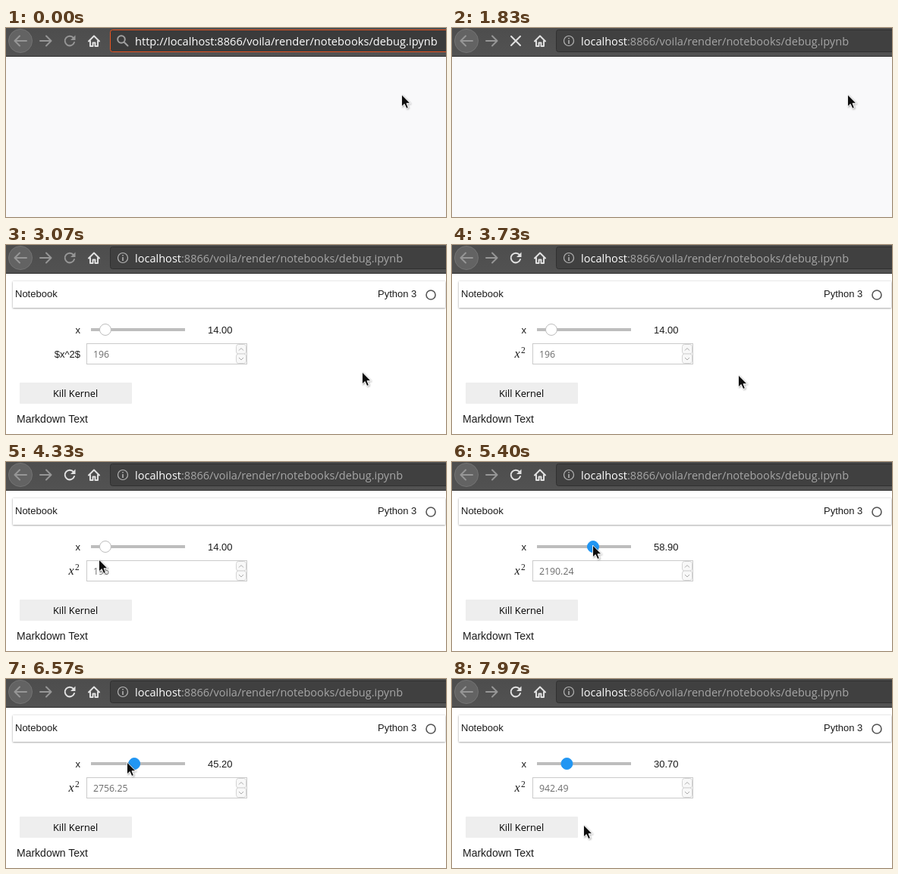
These frames come from a looping animation (580x250 px, 8 s). An HTML page:

```html
<!DOCTYPE html>
<html>
<head>
<meta charset="utf-8">
<style>
html, body { margin: 0; width: 100%; height: 100%; overflow: hidden; background: #fff; }
svg { display: block; }
text { font: 13px "Liberation Sans", Arial, sans-serif; fill: #1c1c1c; white-space: pre; }
.ui { font-family: "Open Sans", "Noto Sans", sans-serif; }
.url { font-size: 14.56px; fill: #a6a6a6; }
.lit { fill: #fff; }
.math { font-family: "Liberation Serif", Times, serif; }
.line { fill: none; stroke-width: 2; stroke-linecap: round; stroke-linejoin: round; }
</style>
</head>
<body>
<svg width="580" height="250" viewBox="0 0 580 250">
  <defs>
    <linearGradient id="chrome" x2="0" y2="1">
      <stop stop-color="#4d4d4d"/><stop offset="1" stop-color="#525252"/>
    </linearGradient>
    <filter id="shade" x="-5%" y="-20%" width="110%" height="150%">
      <feDropShadow dx="0" dy=".6" stdDeviation=".9" flood-opacity=".45"/>
    </filter>
    <filter id="soft" x="-40%" y="-40%" width="200%" height="200%">
      <feDropShadow dx="1" dy="1" stdDeviation="1" flood-opacity=".35"/>
    </filter>
  </defs>

  <rect id="page" y="38" width="580" height="212"/>

  <g id="header">
    <rect x="9" y="48" width="570" height="35" fill="#fff" filter="url(#shade)"/>
    <text x="12" y="69">Notebook</text>
    <text x="490" y="69">Python 3</text>
    <circle id="kernel" cx="560" cy="66" r="6" stroke="#555" stroke-width="1.6"/>
  </g>

  <g id="widgets">
    <text x="98" y="117" text-anchor="end">x</text>
    <rect x="112" y="110" width="124" height="4" fill="#bdbdbd"/>
    <circle id="knob" cy="112" r="7.5"/>
    <text id="value" x="266" y="117"></text>
    <text id="raw" x="98" y="149" text-anchor="end">$x^2$</text>
    <g id="typeset">
      <text class="math" x="82.5" y="149" style="font-size:16px;font-style:italic">x</text>
      <text class="math" x="91" y="143" style="font-size:11.5px">2</text>
    </g>
    <rect x="106.5" y="130.5" width="211" height="27" fill="#fff" stroke="#cacaca"/>
    <text id="square" class="ui" x="115" y="149" style="font-size:12.3px;fill:#6c6c6c"></text>
    <g fill="#f8f8f8" stroke="#d4d4d4">
      <rect x="303.5" y="131.5" width="13" height="12.5" rx="3"/>
      <rect x="303.5" y="144" width="13" height="12.5" rx="3"/>
      <path d="M307 139.5l3-3 3 3M307 149l3 3 3-3" fill="none" stroke="#aaa"/>
    </g>
    <rect x="18" y="182" width="148" height="28" rx="1" fill="#eee"/>
    <text class="ui" x="62" y="201" style="font-size:12.75px;fill:#000">Kill Kernel</text>
    <text x="14" y="235" style="font-size:14px">Markdown Text</text>
  </g>

  <rect width="580" height="38" fill="url(#chrome)"/>
  <rect y="37" width="580" height="1" fill="#2c2c2c"/>
  <circle cx="19" cy="17" r="15.5" fill="#636363" stroke="#737373"/>
  <path class="line" stroke="#969696" d="M27 17H12M18 10.5L11.5 17l6.5 6.5M45 17h14M53 10.5l6.5 6.5-6.5 6.5"/>
  <g id="reload">
    <path class="line" d="M89 13.2A6.3 6.3 0 1 0 90 19"/>
    <path d="M91.5 9.5v6.5h-6.5z" stroke="none"/>
  </g>
  <path id="stop" class="line" stroke="#e2e2e2" d="M78 11l12 12M90 11L78 23"/>
  <path class="line" stroke="#e2e2e2" d="M109 17.5l7-7 7 7M111 17v7h3.5v-4.5h3V24h3.5v-7"/>
  <rect id="field" x="137.5" y="2.5" width="460" height="29" rx="3"/>
  <path id="search" class="line" stroke="#a0a0a0" d="M155.5 18.5l5 5M156.8 15a4.8 4.8 0 1 1-9.6 0a4.8 4.8 0 1 1 9.6 0"/>
  <g id="info" stroke="#b5b5b5">
    <circle cx="154" cy="17" r="6.5" fill="none" stroke-width="1.2"/>
    <path d="M154 16v5M154 13v1.6" stroke-width="1.5"/>
  </g>
  <text id="typed" class="ui url lit" x="170" y="23" style="font-size:14.66px">http://localhost:8866/voila/render/notebooks/debug.ipynb</text>
  <text id="visited" class="ui url" x="170" y="23"><tspan class="lit">localhost</tspan>:8866/voila/render/notebooks/debug.ipynb</text>
  <rect id="caret" x="569" y="9" width="1" height="17" fill="#f4f4f4"/>

  <path id="mouse" d="M-.5 0V16l3.7-3.4L5.8 18.5l2.6-1.1L6 11.7H11z" fill="#111" stroke="#fff" stroke-width=".9" filter="url(#soft)"/>
</svg>
<script>
const LOOP = 8000, STEP = 30;
const el = id => document.getElementById(id);
const set = (id, attrs) => { for (const k in attrs) el(id).setAttribute(k, attrs[k]); };
const show = (id, on) => set(id, { opacity: +on });
const ramp = (t, a, b) => Math.min(1, Math.max(0, (t - a) / (b - a)));

// Keys: [time, x, y]
const mousePath = [
  [2070, 522, 88], [2290, 508, 113], [2530, 508, 113], [3060, 470, 168],
  [3300, 455, 176], [3470, 455, 176], [4260, 124, 141], [4320, 123, 129],
  [4590, 125, 110], [4970, 125, 110], [5400, 186, 110], [5580, 216, 170],
  [5760, 222, 110], [6030, 222, 110], [6570, 160, 110], [6830, 144, 109],
  [7570, 144, 109], [7740, 187, 150], [7950, 174, 193]
];
// Keys: [time, slider value]
const sliderPath = [
  [4970, 14], [5325, 46.8], [5400, 58.9], [5770, 95],
  [6030, 95], [6495, 52.5], [6570, 45.2], [6830, 30.7]
];

// Smooth curve through the keys that rests at turns and holds
function along(keys, t, c) {
  const last = keys.length - 1;
  if (t <= keys[0][0]) return keys[0][c];
  if (t >= keys[last][0]) return keys[last][c];
  const i = keys.findIndex(k => k[0] > t) - 1;
  const slope = j => j < 0 || j >= last ? 0 : (keys[j + 1][c] - keys[j][c]) / (keys[j + 1][0] - keys[j][0]);
  const tangent = j => {
    const a = slope(j - 1), b = slope(j);
    return a * b > 0 ? 2 * a * b / (a + b) : 0;
  };
  const a = keys[i], b = keys[i + 1], d = b[0] - a[0], u = (t - a[0]) / d, v = 1 - u;
  return a[c] * v * v * (1 + 2 * u) + b[c] * u * u * (3 - 2 * u)
    + d * u * v * (tangent(i) * v - tangent(i + 1) * u);
}

const sliderAt = t => Math.round(along(sliderPath, t, 1) * 10) / 10;

function draw(t) {
  const tick = t - t % STEP;
  const typing = t < 1070;
  show('typed', typing);
  show('visited', !typing);
  show('caret', t >= 230 && typing);
  set('field', { fill: typing ? '#3b3b3b' : '#404040', stroke: typing ? '#e95420' : '#303030' });
  show('search', t < 1830);
  show('info', t >= 1830);

  const loading = ramp(t, 1070, 1500) - ramp(t, 2540, 2960);
  const tone = t >= 3300 ? '#e2e2e2' : '#969696';
  set('stop', { opacity: loading, transform: `rotate(${(1 - loading) * -90} 84 17)` });
  set('reload', { opacity: 1 - loading, stroke: tone, fill: tone, transform: `rotate(${loading * 180} 84 17)` });

  set('page', { fill: t < 2070 ? '#f9f9fa' : '#fff' });
  show('header', t >= 2070);
  show('widgets', t >= 2540);
  show('raw', t < 3500);
  show('typeset', t >= 3500);
  set('kernel', { fill: t < 2900 ? '#555' : '#fff' });

  const value = sliderAt(tick), seen = sliderAt(tick - 75);
  el('value').textContent = value.toFixed(2);
  el('square').textContent = +(seen * seen).toFixed(2);
  const active = t >= 4560;
  set('knob', {
    cx: 113.8 + 1.225 * value,
    fill: active ? '#2196f3' : '#fff',
    stroke: active ? '#2196f3' : '#bdbdbd'
  });

  const x = Math.round(along(mousePath, tick, 1)), y = Math.round(along(mousePath, tick, 2));
  set('mouse', { transform: `translate(${x} ${y})` });
}

function frame() {
  draw(performance.now() % LOOP);
  requestAnimationFrame(frame);
}
frame();
</script>
</body>
</html>
```
